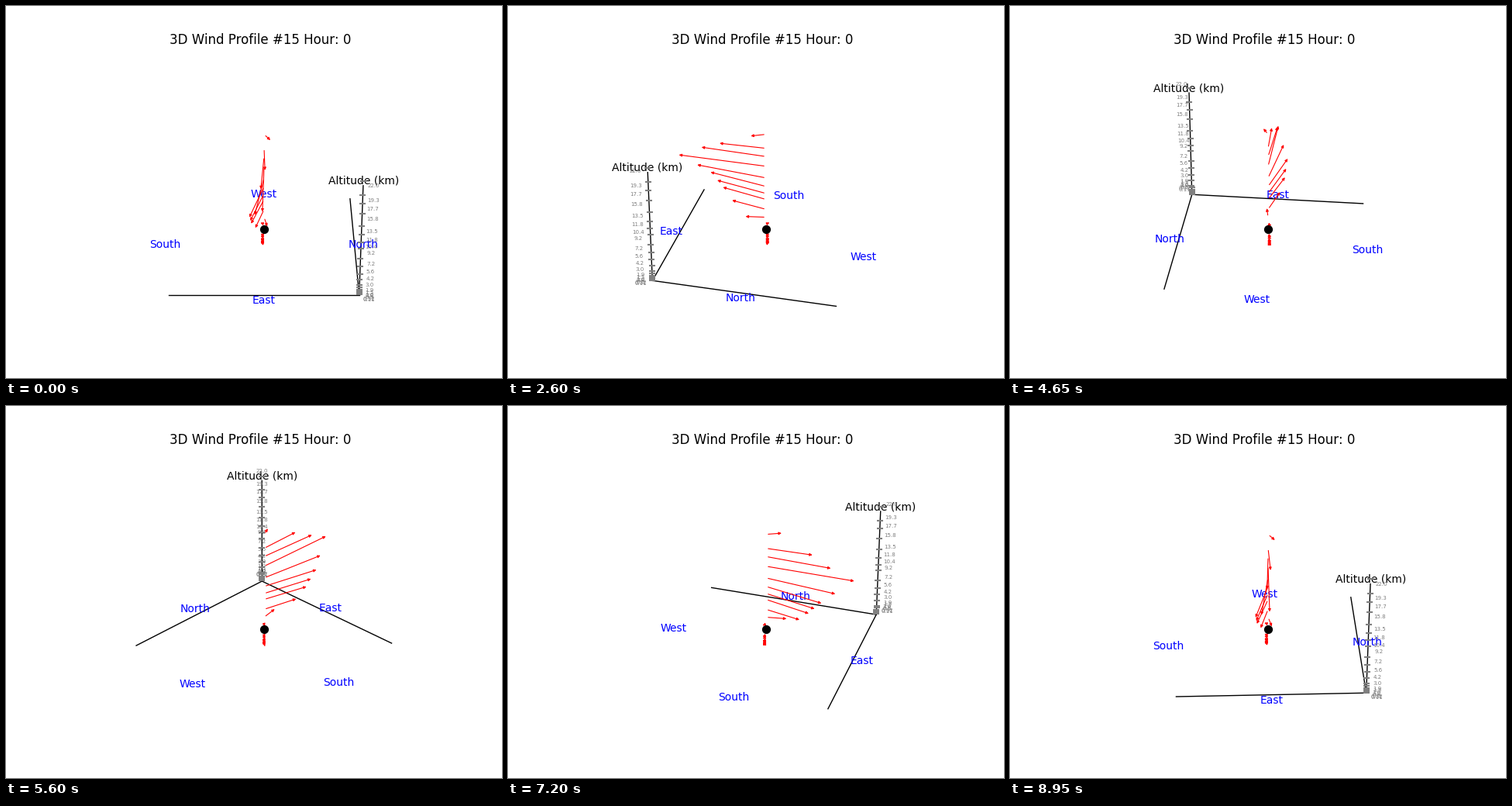
Write a matplotlib script that moves like this. It is 640x480 px and loops after 9 s.

```python
import numpy as np
import matplotlib.pyplot as plt
from matplotlib.animation import FuncAnimation
from matplotlib.patches import FancyArrowPatch

W, H, FRAMES = 640, 480, 180
ELEV = np.radians(30)
CENTER = (333.0, 237.4)
SCALE, DIST = 199.8, 10.0

# Scene units: box half width, ground level, top of the axis, height of 1 km
HALF, GROUND, TOP, KM = 0.5952, -0.414, 0.374, 0.0373
OUT = 1.1 * HALF

# Pressure levels in hPa
PRESSURES = [*range(1000, 899, -25), 850, 800, *range(700, 299, -100),
             *range(250, 99, -50), *range(70, 29, -20)]

# Key points of the wind profile: km, east, north (scene units)
PROFILE = np.array([
    (4.2, -0.017, -0.024), (5.6, 0.153, 0.027), (7.2, 0.267, -0.064),
    (9.2, 0.336, -0.091), (11.8, 0.421, -0.100), (15.8, 0.607, -0.011),
    (17.7, 0.456, -0.022), (22.0, 0.107, 0.054),
])


def altitude(pressure):
    """Barometric height in km, rounded more coarsely higher up."""
    km = 44.33 * (1 - (pressure / 1013.25) ** 0.1903)
    return round(km, 2 if km < 0.4 else 1 if km < 20 else 0)


def wind(km):
    keys, east, north = PROFILE.T
    return np.interp(km, keys, east), np.interp(km, keys, north)


def height(km):
    return GROUND + KM * km


def project(point, azim):
    """Perspective view of a scene point, in stage pixels."""
    x, y, z = point
    c, s = np.cos(azim), np.sin(azim)
    right = y * c - x * s
    near = x * c + y * s
    up = z * np.cos(ELEV) - near * np.sin(ELEV)
    depth = near * np.cos(ELEV) + z * np.sin(ELEV)
    k = SCALE / (1 - depth / DIST)
    return CENTER[0] + k * right, CENTER[1] - k * up


fig = plt.figure(figsize=(6.4, 4.8), dpi=100, facecolor="white")
ax = fig.add_axes([0, 0, 1, 1])
ax.set_xlim(0, W)
ax.set_ylim(H, 0)
ax.axis("off")

ax.text(328, 49.3, "3D Wind Profile #15 Hour: 0", fontsize=12,
        ha="center", va="baseline")

# Axis lines from the shared corner
corner = (HALF, HALF, GROUND)
ends = [(-HALF, HALF, GROUND), (HALF, -HALF, GROUND), (HALF, HALF, TOP)]
axis_lines = [(ax.plot([], [], color="black", lw=1, zorder=2)[0], end)
              for end in ends]

levels = [altitude(p) for p in PRESSURES]
labels = []


def add_label(text, point, color, size):
    label = ax.text(0, 0, text, color=color, fontsize=size,
                    ha="center", va="center", zorder=3)
    labels.append((label, point))


add_label("North", (0, OUT, GROUND), "blue", 10)
add_label("South", (0, -OUT, GROUND), "blue", 10)
add_label("East", (OUT, 0, GROUND), "blue", 10)
add_label("West", (-OUT, 0, GROUND), "blue", 10)
add_label("Altitude (km)", (HALF, HALF, height(22)), "black", 10)
for km in levels:
    add_label(str(km), (OUT, OUT, height(km)), "gray", 5)

tick_points = [(HALF, HALF, height(km)) for km in levels]
ticks, = ax.plot([], [], ls="", marker="_", ms=6, mew=1.5, color="gray",
                 zorder=4)

arrows = []
for km in levels:
    arrow = FancyArrowPatch((0, 0), (1, 1), arrowstyle="-|>", color="red",
                            mutation_scale=5, lw=0.8, shrinkB=3, zorder=5)
    ax.add_patch(arrow)
    z = height(km)
    arrows.append((arrow, (0, 0, z), (*wind(km), z)))

ax.scatter(*project((0, 0, height(3.12)), 0), s=50, color="black", zorder=6)


def update(frame):
    azim = 2 * np.pi * frame / FRAMES
    start = project(corner, azim)
    for line, end in axis_lines:
        line.set_data(*zip(start, project(end, azim)))
    for label, point in labels:
        label.set_position(project(point, azim))
    ticks.set_data(*zip(*(project(p, azim) for p in tick_points)))
    for arrow, tail, tip in arrows:
        arrow.set_positions(project(tail, azim), project(tip, azim))
    return []


anim = FuncAnimation(fig, update, frames=FRAMES, interval=50, repeat=True,
                     init_func=lambda: update(0), blit=False)
plt.show()
```
